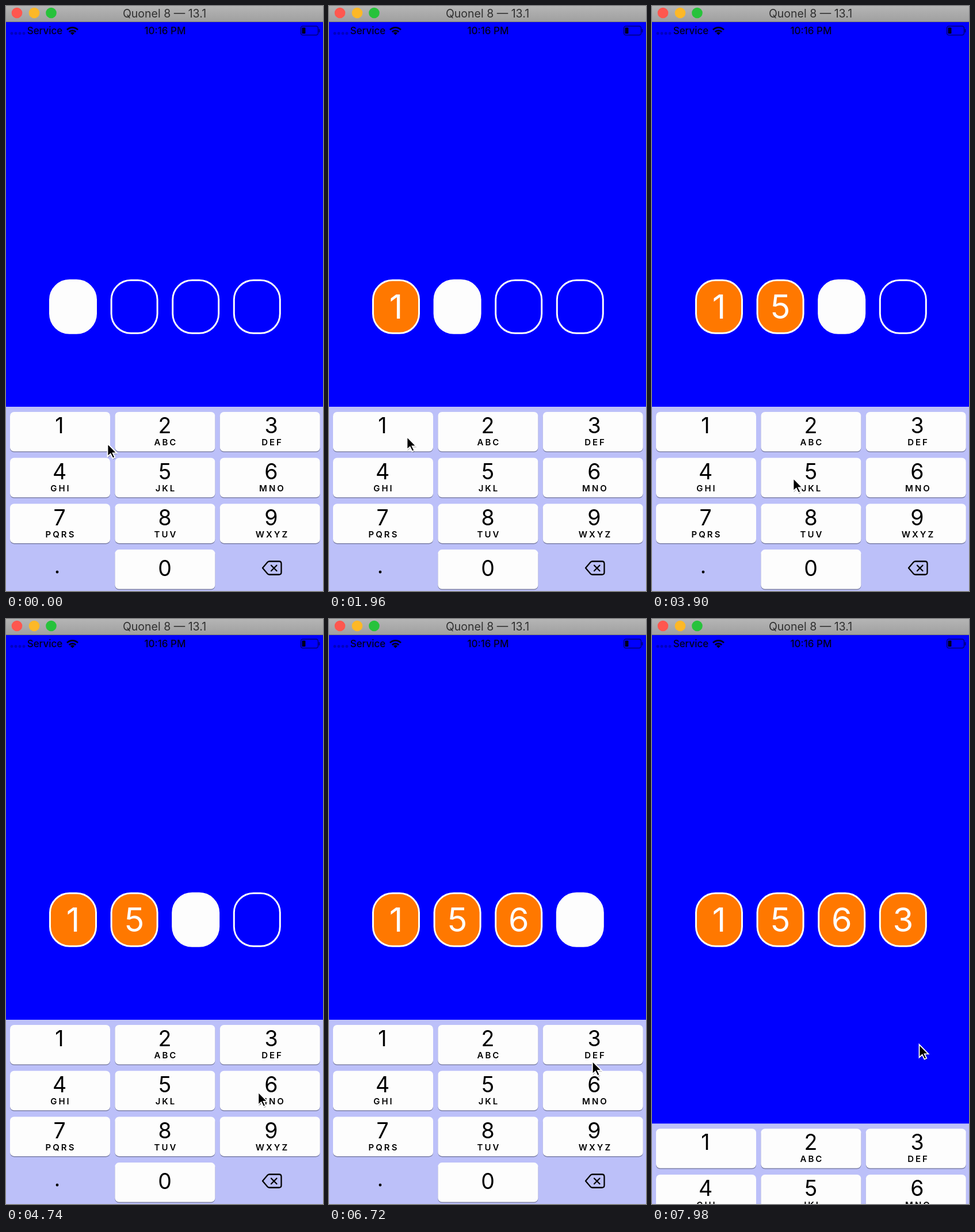
An HTML page that plays this animation: 551 px wide and 1016 px high, repeating every 8 s.

```html
<!DOCTYPE html>
<html lang="en">
<head>
<meta charset="utf-8">
<title>Passcode entry</title>
<style>
html, body { margin: 0; width: 100%; height: 100%; overflow: hidden; background: #00f; }
svg { display: block; width: 100vw; height: 100vh; }
text { font-family: Inter, "Open Sans", sans-serif; text-anchor: middle; }
.status { font-size: 17px; font-weight: 500; }
.num { font-size: 37.5px; }
.abc { font-size: 15px; font-weight: 600; letter-spacing: 3px; }
.digit { font-size: 58px; fill: #fdfdfd; }
</style>
</head>
<body>
<svg viewBox="0 0 551 1016">
  <defs>
    <linearGradient id="bar" x2="0" y2="1">
      <stop offset="0" stop-color="#b5b5b5"/>
      <stop offset="1" stop-color="#9f9f9f"/>
    </linearGradient>
  </defs>
  <rect width="551" height="1016" fill="#00f"/>

  <rect width="551" height="28" fill="url(#bar)"/>
  <rect y="27" width="551" height="1" fill="#777"/>
  <circle cx="19" cy="12" r="9.3" fill="#ff574f"/>
  <circle cx="49" cy="12" r="9.3" fill="#fdb827"/>
  <circle cx="78.500" cy="12" r="9.3" fill="#27c23b"/>
  <text x="275.500" y="19.500" font-size="19.500" fill="#303030">Quonel 8 — 13.1</text>

  <g fill="#00001c">
    <g fill="#0000c0">
      <circle cx="10" cy="47.500" r="2.500"/><circle cx="17" cy="47.500" r="2.500"/>
      <circle cx="24" cy="47.500" r="2.500"/><circle cx="31" cy="47.500" r="2.500"/>
    </g>
    <text class="status" x="67.500" y="49">Service</text>
    <text class="status" x="276.500" y="49">10:16 PM</text>
    <path d="M115.500 50.500l-3.700-3.800a5.300 5.300 0 0 1 7.400 0z"/>
    <path d="M106 41.200a13.500 13.500 0 0 1 19 0M109.700 45a8.300 8.300 0 0 1 11.600 0" fill="none" stroke="#00001c" stroke-width="2.800"/>
    <rect x="512.500" y="35" width="30" height="15.500" rx="3.500" fill="none" stroke="#000078" stroke-width="1.500"/>
    <rect x="514.500" y="37.500" width="6" height="10.500" rx="1"/>
    <rect x="543.500" y="40" width="2" height="6" rx="1" fill="#000078"/>
  </g>

  <g id="boxes"></g>
  <g id="board">
    <rect y="696" width="551" height="321" fill="#bcc0f9"/>
    <g id="keys"></g>
    <circle cx="89" cy="983" r="2.400"/>
    <g fill="none" stroke="#000" stroke-width="2.300" stroke-linejoin="round" stroke-linecap="round">
      <path d="M446 976l8.500-10q1.400-1.500 3.500-1.500h16.500q4 0 4 4v15q0 4-4 4h-16.500q-2.100 0-3.500-1.500z"/>
      <path d="M461 971.500l9.500 9.500m0-9.500l-9.500 9.500"/>
    </g>
  </g>
  <g id="cursor">
    <path d="M1 1v22.500l5.200-4.700 3.800 7.700 3.800-1.700-3.700-7.400h6.900z" fill="#000" opacity=".25" transform="translate(1 2)"/>
    <path d="M1 1v22.500l5.200-4.700 3.800 7.700 3.800-1.700-3.700-7.400h6.900z" stroke="#fff" stroke-width="1.800"/>
  </g>
</svg>
<script>
const $ = id => document.getElementById(id);
const LOOP = 8000, SLIDE_AT = 7800, SLIDE_BY = 320;

// Each press: key, down time, up time (ms); the digit appears on release.
const presses = [[1, 1640, 1800], [5, 3360, 3520], [6, 5120, 5280], [3, 7360, 7700]];

// Pointer path: time, x, y of the tip.
const path = [
  [0, 176, 760], [350, 176, 760], [1000, 135, 748], [2150, 135, 748],
  [2950, 245, 820], [3900, 245, 820], [4650, 437, 821], [5050, 444, 825],
  [6200, 444, 825], [7050, 464, 739], [LOOP, 464, 739]
];

function add(parent, tag, attrs, content = '') {
  const el = document.createElementNS('http://www.w3.org/2000/svg', tag);
  for (const name in attrs) el.setAttribute(name, attrs[name]);
  el.textContent = content;
  return parent.appendChild(el);
}

const letters = ['', 'ABC', 'DEF', 'GHI', 'JKL', 'MNO', 'PQRS', 'TUV', 'WXYZ'];
const keys = {};

function addKey(n, col, row) {
  const x = 7 + col * 182.4, y = 705 + row * 79.7, mid = [93, 276, 461][col];
  const shape = { x, width: 174, height: 68.5, rx: 7 };
  add($('keys'), 'rect', { ...shape, y: y + 1.5, fill: '#7d80a6' });
  keys[n] = add($('keys'), 'rect', { ...shape, y });
  add($('keys'), 'text', { class: 'num', x: mid, y: n ? 742 + row * 80 : 990 }, n);
  if (n) add($('keys'), 'text', { class: 'abc', x: mid + 2, y: 763 + row * 80 }, letters[n - 1]);
}
for (let n = 1; n < 10; n++) addKey(n, (n - 1) % 3, Math.floor((n - 1) / 3));
addKey(0, 1, 3);

const boxes = presses.map(([n], i) => {
  const x = 76.5 + i * 106.6;
  return {
    rect: add($('boxes'), 'rect', { x, y: 476.3, width: 80, height: 92, rx: 34, stroke: '#fdfdfd', 'stroke-width': 3 }),
    text: add($('boxes'), 'text', { class: 'digit', x: x + 40, y: 543 }, n)
  };
});

function pointer(t) {
  const i = path.findIndex(p => p[0] > t);
  const [t0, x0, y0] = path[i - 1], [t1, x1, y1] = path[i];
  const u = (t - t0) / (t1 - t0), e = u * u * (3 - 2 * u);
  return [x0 + (x1 - x0) * e, y0 + (y1 - y0) * e];
}

// Critically damped spring for the keyboard leaving.
function slide(t) {
  const w = Math.max(0, t - SLIDE_AT) * 0.0105;
  return SLIDE_BY * (1 - (1 + w) * Math.exp(-w));
}

function draw(now) {
  const t = now % LOOP;
  const entered = presses.filter(p => t >= p[2]).length;
  const held = presses.find(p => t >= p[1] && t < p[2]);
  boxes.forEach(({ rect, text }, i) => {
    rect.setAttribute('fill', i < entered ? '#ff7800' : i === entered ? '#fdfdfd' : 'none');
    text.setAttribute('visibility', i < entered ? 'visible' : 'hidden');
  });
  for (const n in keys) keys[n].setAttribute('fill', held && held[0] == n ? '#98a6fb' : '#fdfdfd');
  const [x, y] = pointer(t);
  $('cursor').setAttribute('transform', `translate(${x - 0.5} ${y - 1})`);
  $('board').setAttribute('transform', `translate(0 ${slide(t)})`);
}

let start;
function tick(now) {
  start ??= now;
  draw(now - start);
  requestAnimationFrame(tick);
}
draw(0);
requestAnimationFrame(tick);
</script>
</body>
</html>
```
